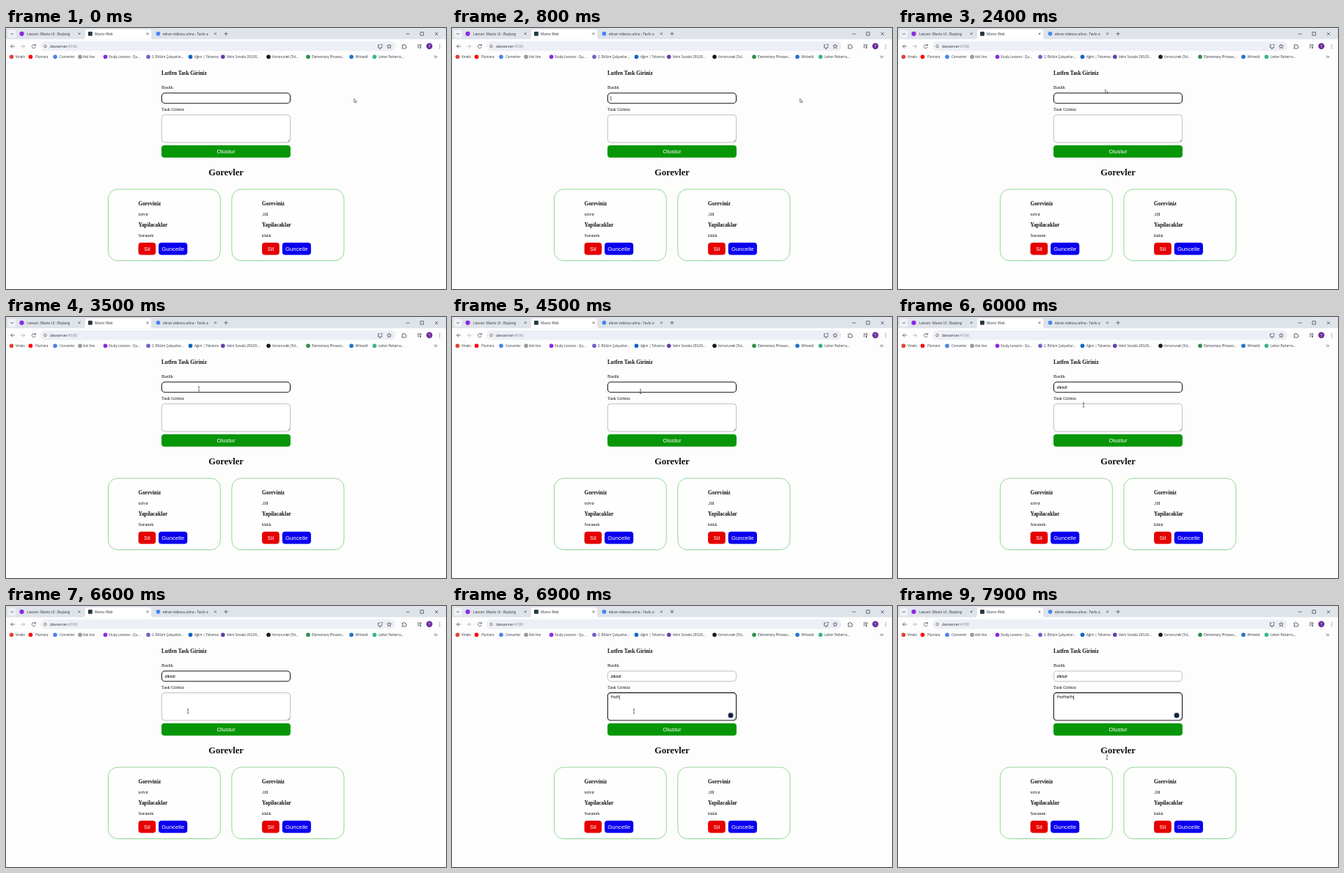
An HTML page that plays this animation: 600 by 356 pixels, repeating every 8 s.

```html
<!DOCTYPE html>
<html lang="tr">
<head>
<meta charset="utf-8">
<title>Task list</title>
<style>
  html, body { margin: 0; width: 100%; height: 100%; overflow: hidden; background: #fdfdfd; }
  svg { display: block; width: 600px; height: 356px; }
  text { white-space: pre; }
  .ui { font-family: "Open Sans", "Noto Sans", sans-serif; fill: #30343a; }
  .serif { font-family: "Liberation Serif", "Times New Roman", serif; fill: #111; }
  .arial { font-family: "Liberation Sans", Arial, sans-serif; }
  .mono { font-family: "Noto Sans Mono", monospace; }
  .bold { font-weight: bold; }
  .line { fill: none; stroke: #45494f; stroke-width: .75; }
</style>
</head>
<body>
<svg id="stage" viewBox="0 0 600 356"></svg>
<script>
const stage = document.getElementById('stage');

function add(tag, attrs, content) {
  const el = document.createElementNS('http://www.w3.org/2000/svg', tag);
  for (const key in attrs) el.setAttribute(key, attrs[key]);
  if (content !== undefined) el.textContent = content;
  stage.append(el);
  return el;
}
const rect = (x, y, width, height, rx, fill, more) => add('rect', { x, y, width, height, rx, fill, ...more });
const dot = (cx, cy, r, fill, more) => add('circle', { cx, cy, r, fill, ...more });
const line = (d, more) => add('path', { d, class: 'line', ...more });
const text = (x, y, size, cls, content, more) => add('text', { x, y, 'font-size': size, class: cls, ...more }, content);
const cross = (x, y, r) => line(`M${x - r} ${y - r}l${2 * r} ${2 * r}m0 ${-2 * r}l${-2 * r} ${2 * r}`);

function drawTabs() {
  rect(0, 0, 600, 15.5, 0, '#dfe3ea');
  rect(2.5, 2.5, 11, 11, 3.5, '#eef1f6');
  line('M6 7l2 2 2-2');
  add('path', { d: 'M105 15.5q3 0 3-3V5q0-3 3-3h84q3 0 3 3v7.5q0 3 3 3z', fill: '#fff' });
  dot(21.5, 7.8, 3.1, '#8a2be2');
  rect(112, 5, 5.8, 5.8, 1, '#223844');
  dot(207.5, 7.8, 2.8, '#4285f4');
  text(29, 9.7, 4.7, 'ui', 'Lesson: Mavto UI : Başlang');
  text(121, 9.7, 4.7, 'ui', 'Mavto Web');
  text(214, 9.7, 4.7, 'ui', 'ekran videosu alma - Tavlo a');
  for (const x of [100, 193, 285.5]) cross(x, 7.8, 1.4);
  line('M297.5 7.8h5m-2.5-2.5v5');
  line('M545.5 8h5M565 5.7h4.4v4.4h-4.4z');
  cross(587, 8, 2.1);
}

function drawToolbar() {
  rect(0, 15.5, 600, 31, 0, '#fdfdfe');
  rect(47, 18.3, 484, 13, 6.5, '#eceff5');
  line('M12 25H6.5m2.5-2.5L6.5 25 9 27.5');
  line('M20 25h5.5M23 22.5l2.5 2.5-2.5 2.5', { style: 'stroke:#a5a8ad' });
  line('M40 23.7a2.5 2.5 0 1 0 .3 2.1M40.4 22v2h-2');
  dot(53.5, 24.9, 3.7, '#fff');
  dot(53.5, 24.9, 2.1, 'none', { stroke: '#45494f', 'stroke-width': .65 });
  line('M53.5 24.6v1.4M53.5 23.5v.5');
  const url = text(60, 26.8, 5.2, 'ui', 'devserver');
  const port = document.createElementNS(url.namespaceURI, 'tspan');
  port.textContent = ':4100';
  port.setAttribute('fill', '#777c84');
  url.append(port);
  line('M510 23h-2.5v4h5v-2M509 28.5h2M511 22.5h2v2');
  line('M522.5 22l.8 2 2.1.2-1.6 1.4.5 2.1-1.8-1.1-1.8 1.1.5-2.1-1.6-1.4 2.1-.2z');
  line('M540 23.5h1.5q0-1.4 1-1.4t1 1.4h1.5v1.5q1.4 0 1.4 1t-1.4 1v1h-5v-1.3q1.2 0 1.2-.9t-1.2-.9z');
  line('M561 22.8h5M561 24.8h3M561 26.8h2M565.3 27v-3.4h1.6');
  dot(565, 27, .9, '#45494f');
  dot(577.3, 24.8, 4.2, '#6a2c9a');
  text(577.3, 26.5, 4.5, 'ui', 'T', { 'text-anchor': 'middle', style: 'fill:#fff' });
  for (const y of [22.8, 25, 27.2]) dot(591.5, y, .55, '#45494f');
}

function drawBookmarks() {
  const items = [
    [7.5, 13, '#e04438', 'Vmelo'],
    [33.5, 40, '#f00', 'Plumora'],
    [67, 73, '#4b82e8', 'Converter'],
    [101, 105, '#999', 'Ask line'],
    [135.5, 140, '#8a2be2', 'Study Lessons - Qu...'],
    [194, 199, '#7560c8', '2. Bölüm Çalışanlar...'],
    [251.5, 257, '#0a66c2', 'Ağım | Tolvenra'],
    [295.8, 301, '#6540a5', 'Velm Sorado 200,00...'],
    [358, 363, '#181a1d', 'tlvrsorunek (Tol...'],
    [412, 417, '#2f8f4e', 'Elementary Phrases...'],
    [471, 476.5, '#2474c8', 'Wrkveld'],
    [502.5, 508, '#39b58c', 'Letter Patterns...']
  ];
  for (const [iconX, x, color, label] of items) {
    dot(iconX, 39.3, 2.8, color);
    text(x, 41, 4.45, 'ui', label);
  }
  line('M584 37.7l1.6 1.6-1.6 1.6m2.2-3.2l1.6 1.6-1.6 1.6');
}

function button(x, y, width, height, color, label) {
  rect(x, y, width, height, 4, color);
  text(x + width / 2, y + height / 2 + 2.8, 7.81, 'arial', label, { 'text-anchor': 'middle', fill: '#fff' });
}

function card(x, title, task) {
  rect(x, 220, 153, 97.5, 13, '#fefefe', { stroke: '#5fc25f', 'stroke-width': .65 });
  const left = x + 41.2;
  text(left, 242, 7.31, 'serif bold', 'Goreviniz');
  text(left, 256, 6.25, 'serif', title);
  text(left, 271, 7.31, 'serif bold', 'Yapilacaklar');
  text(left, 285, 6.25, 'serif', task);
  button(left, 292.7, 23.7, 16.7, '#e60000', 'Sil');
  button(left + 27.6, 292.7, 39.2, 16.7, '#0b00ee', 'Guncelle');
}

drawTabs();
drawToolbar();
drawBookmarks();

text(212, 64, 7.31, 'serif bold', 'Lutfen Task Giriniz');
text(212, 83, 6.25, 'serif', 'Baslik');
text(212, 112.7, 6.25, 'serif', 'Task Giriniz');
const titleBox = rect(212.3, 88.8, 175.3, 14, 4.5, '#fff');
const taskBox = rect(212.3, 118.4, 175.3, 37.6, 4, '#fff');
line('M384 155l2.8-2.8M385.6 155l1.2-1.2', { style: 'stroke-width:.45' });
button(212, 160, 176, 16.8, '#079607', 'Olustur');
text(300, 200.7, 12.5, 'serif bold', 'Gorevler', { 'text-anchor': 'middle' });
card(139.3, 'tolvir', 'Sorunek');
card(307.9, ',llll', 'kkkk');

const titleText = text(216.5, 97.6, 5.21, 'arial', '');
const taskText = text(216.3, 126.4, 4.77, 'mono', '');
const caret = rect(0, 0, .65, 6, 0, '#111');
const badge = dot(380, 149.2, 3.9, '#10243e', { stroke: '#e4e8ee', 'stroke-width': .8 });
const arrow = add('path', { fill: '#fff', stroke: '#222', 'stroke-width': .5 });
const beam = add('path', { fill: 'none', stroke: '#333', 'stroke-width': .65 });
const arrowShape = 'v5l1.2-1 1 2 .8-.4-.9-1.9h1.6z';
const beamShape = 'm-1.2-2.8h2.4m-1.2 0v5.6m-1.2 0h2.4';

// Each table row holds from its time in ms until the next row.
const pointer = [
  [0, 474.5, 96.3], [900, 380, 90], [1000, 282.5, 83.8],
  [2700, 273, 88], [3200, 263, 98], [3600, 257, 101.7],
  [5700, 256, 108], [5900, 253, 120], [6100, 250, 133], [6300, 248, 143.5],
  [7900, 285, 206.5]
];
const caretOn = [
  [0, 0], [800, 1], [1400, 0], [1900, 1], [2400, 0], [2900, 1], [3500, 0], [4000, 1],
  [4500, 0], [4700, 1], [5600, 0], [6100, 1], [6600, 0], [6700, 1]
];
const titleTyped = [[0, 0], [4700, 1], [4800, 2], [4900, 4], [5000, 5], [5300, 6]];
const taskTyped = [[0, 0], [6800, 2], [6900, 4], [7000, 5], [7200, 7], [7400, 8]];
const at = (table, t) => table.findLast(row => row[0] <= t);
const show = (el, on) => el.setAttribute('visibility', on ? 'visible' : 'hidden');

function setFocus(box, on) {
  box.setAttribute('stroke', on ? '#17191c' : '#8b8b8b');
  box.setAttribute('stroke-width', on ? 1.1 : .55);
}

function render(t) {
  const inTask = t >= 6700;
  setFocus(titleBox, !inTask);
  setFocus(taskBox, inTask);
  titleText.textContent = 'dfkhdf'.slice(0, at(titleTyped, t)[1]);
  taskText.textContent = 'fhdfhdfh'.slice(0, at(taskTyped, t)[1]);

  const field = inTask ? taskText : titleText;
  caret.setAttribute('x', 216.5 + field.getComputedTextLength());
  caret.setAttribute('y', inTask ? 121.8 : 93);
  show(caret, at(caretOn, t)[1]);
  show(badge, t >= 6800);

  const [, x, y] = at(pointer, t);
  const isBeam = t >= 3200;
  show(arrow, !isBeam);
  show(beam, isBeam);
  arrow.setAttribute('d', `M${x} ${y}${arrowShape}`);
  beam.setAttribute('d', `M${x} ${y}${beamShape}`);
}

const start = performance.now();
function tick() {
  render((performance.now() - start) % 8000);
  requestAnimationFrame(tick);
}
tick();
</script>
</body>
</html>
```
